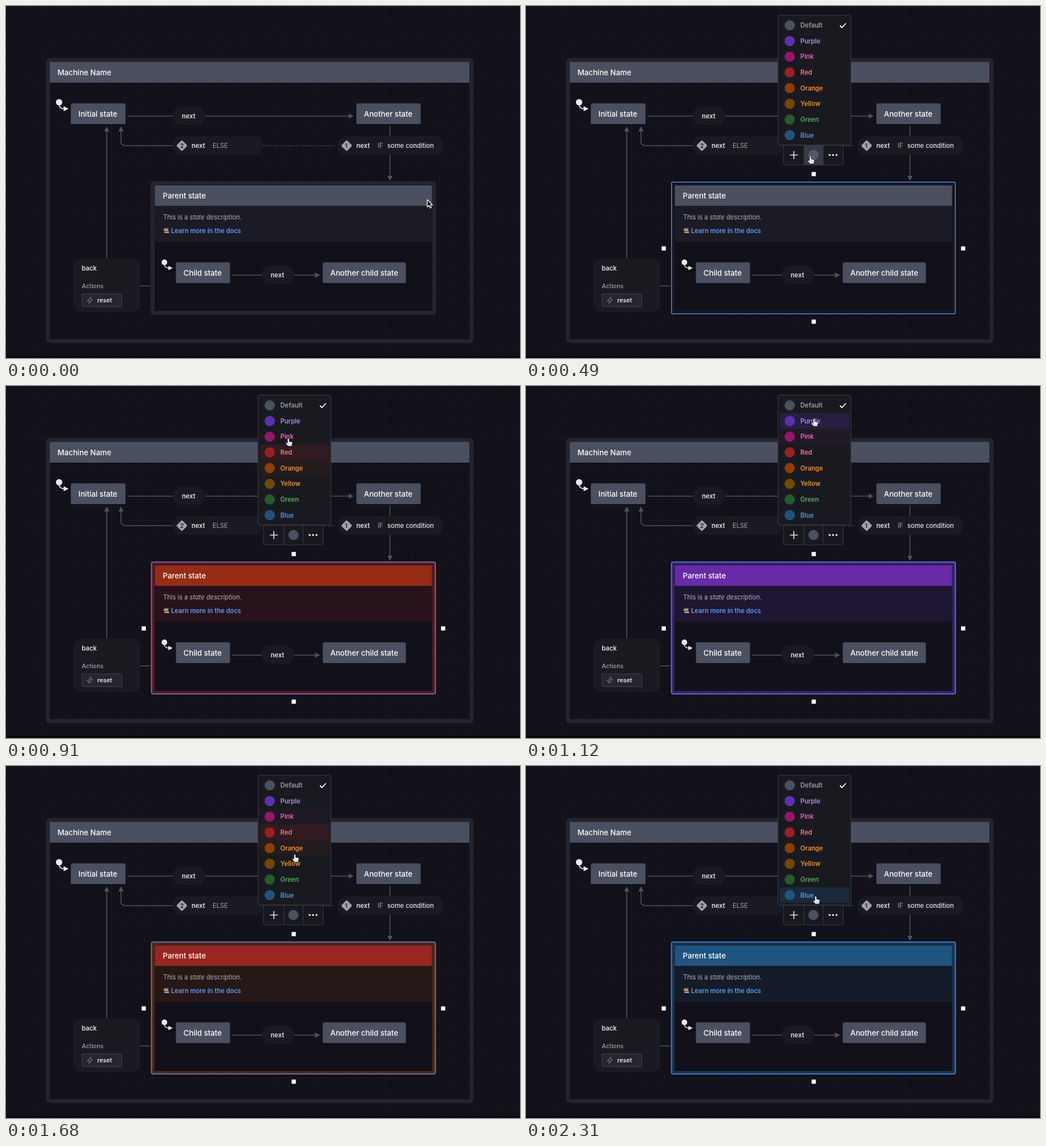
Recreate the animation shown at these times as an HTML page. Size 903 px wide and 620 px high, loop 2.38 s.

```html
<!DOCTYPE html>
<html lang="en">
<head>
<meta charset="utf-8">
<title>State colours</title>
<style>
  html, body { margin: 0; width: 100%; height: 100%; overflow: hidden; background: #12111a; }
  svg { display: block; width: 903px; height: 620px; font-family: Inter, "Open Sans", sans-serif; }
  text { white-space: pre; }
</style>
</head>
<body>
<svg id="stage" viewBox="0 0 903 620"></svg>
<script>
const LOOP = 2380, STEP = 70, SELECT = 140, OPEN = 420, HOVER = 560;
const ROW = 27.63, ROW_TOP = 20.2, LAG = 40;
const BG = [18, 17, 26], EDGE = '#4f515b', SLATE = '#4a505f';

// name, swatch, label colour
const colours = [
  ['Default', [74, 80, 95], '#9c9ba2'],
  ['Purple', [93, 48, 184], '#a98df0'],
  ['Pink', [152, 20, 105], '#f55fc0'],
  ['Red', [156, 31, 31], '#f27878'],
  ['Orange', [143, 61, 0], '#f28b30'],
  ['Yellow', [116, 72, 0], '#e59426'],
  ['Green', [36, 92, 44], '#4fae57'],
  ['Blue', [30, 85, 128], '#4f96e6']
];
const swatches = colours.map(c => c[1]);

// time, x, y
const path = [
  [0, 740, 341], [70, 740, 341], [210, 640, 310], [350, 520, 270], [420, 500, 266],
  [560, 499, 262], [700, 497, 176], [800, 495, 121], [910, 496, 92], [1000, 502, 62],
  [1120, 506, 57], [1350, 507, 59], [1540, 507, 112], [1890, 508, 220],
  [1960, 509, 229], [2380, 509, 229]
];

const rgb = c => `rgb(${c.map(Math.round)})`;
const mix = (a, b, k) => a.map((v, i) => v + (b[i] - v) * k);

function cursorAt(t) {
  const i = Math.max(1, path.findIndex(p => p[0] >= t));
  const [a, b] = [path[i - 1], path[i]];
  return mix(a, b, Math.max(0, (t - a[0]) / (b[0] - a[0]))).slice(1);
}

function hovered(t) {
  if (t < HOVER) return 0;
  const row = Math.floor((cursorAt(t)[1] - ROW_TOP) / ROW);
  return row > 7 ? 0 : row;
}

// Share of each colour over a linear transition of the given length
function weights(t, span) {
  const w = Array(8).fill(0), n = 15;
  for (let i = 0; i < n; i++) w[hovered(t - LAG - span * (i + .5) / n)] += 1 / n;
  return w;
}
const blend = (w, list) => [0, 1, 2].map(k => w.reduce((s, v, i) => s + v * list[i][k], 0));

const rect = (x, y, w, h, fill, rx = 0, more = '') =>
  `<rect x="${x}" y="${y}" width="${w}" height="${h}" rx="${rx}" fill="${fill}" ${more}/>`;
const text = (x, y, s, size = 11.15, weight = 600, fill = '#e4e3e8') =>
  `<text x="${x}" y="${y}" font-size="${size}" font-weight="${weight}" fill="${fill}">${s}</text>`;
const line = (d, more = '') =>
  `<path d="${d}" fill="none" stroke="${EDGE}" stroke-width="1.6" ${more}/>`;
const circle = (x, y, r, fill) => `<circle cx="${x}" cy="${y}" r="${r}" fill="${fill}"/>`;
const title = (x, y, s) => text(x, y, s, 13.2, 500, '#fff');
const pill = (x, y, w, h) => rect(x, y, w, h, '#1a1a21', 15);
const state = (x, y, w, s) => rect(x, y, w, 36.5, SLATE, 2.5) + title(x + 13.3, y + 23.2, s);
const arrow = (x, y, turn) =>
  `<path d="M0 0L-9 -4.5V4.5Z" fill="${EDGE}" transform="translate(${x} ${y}) rotate(${turn})"/>`;
const diamond = (x, y, s) =>
  rect(-7, -7, 14, 14, '#a3a0ad', 2, `transform="translate(${x} ${y}) rotate(45)"`) +
  text(x - 3, y + 3.6, s, 10, 600, '#1a1a21');
const start = (x, y, k) => `<g transform="translate(${x} ${y}) scale(${k})">${circle(0, 0, 5.6, '#e9e8ec')}
  <path d="M0 4C0 9 4 11.500 9 11.500" fill="none" stroke="#e9e8ec" stroke-width="1.8"/>
  <path d="M16.500 11.500L8 7V16Z" fill="#e9e8ec"/></g>`;

function grid() {
  let d = '';
  for (let y = 21; y < 616; y += 24) d += `M0 ${y}.5H903`;
  for (let x = 17; x < 903; x += 24) d += `M${x}.5 0V616`;
  return `<path d="${d}" stroke="#191923" stroke-dasharray="3 1"/>`;
}

const books = rect(277.5, 391, 8, 2.5, '#3f8a58', .5) + rect(277, 393.5, 8, 2, '#d9cdb8', .5) +
  rect(278, 395.5, 8, 2.2, '#b84545', .5) + rect(278.500, 397.7, 8, 2, '#c9b79c', .5);

const machine =
  rect(73.5, 95, 744.3, 495.3, 'none', 3, 'stroke="#25242d" stroke-width="7"') +
  rect(77, 98.5, 737, 36.5, SLATE) + title(90.5, 122, 'Machine Name') +
  line('M214 194H603M177 445V221M293 246H210Q202 246 202 238V221M674.5 211V299M236 493H255') +
  line('M452 246H579', 'stroke-dasharray="2 2.4"') +
  arrow(611, 194, 0) + arrow(177, 212, -90) + arrow(202, 212, -90) + arrow(674.5, 308, 90) +
  start(93.3, 169.5, 1) +
  state(114, 171.5, 96, 'Initial state') + state(615.5, 171.5, 113, 'Another state') +
  pill(293, 177.500, 57, 32) + text(309, 198, 'next') +
  pill(293, 229, 159, 33) + diamond(309, 246, '2') + text(326, 250, 'next') +
  text(363, 250, 'ELSE', 11.15, 400, '#a5a4ab') +
  pill(583, 229, 185, 33) + diamond(598.5, 246, '1') + text(615.5, 250, 'next') +
  text(653, 250, 'IF', 11.15, 400, '#a5a4ab') + text(670, 250, 'some condition', 11.15, 500) +
  pill(118, 445, 118, 94) + text(133, 466, 'back') +
  text(133, 496.5, 'Actions', 10.6, 500, '#a5a4ab') +
  rect(133.5, 507, 70, 22.5, '#25262e', 2, 'stroke="#42444e"') +
  '<path d="M149 512.500L142.500 519.500H147L145.500 524L152.500 517H148Z" fill="none" stroke="#83848e"/>' +
  text(160.3, 521.8, 'reset', 10.6);

const children =
  text(276, 375.5, 'This is a <tspan font-style="italic">state description</tspan>.', 11.15, 400, '#b4b3b9') +
  books + text(290, 399.5, 'Learn more in the docs', 11.15, 600, '#5b9cf5') +
  start(278.3, 451.5, .88) + line('M397 474H545') + arrow(552, 474, 0) +
  pill(449, 457.5, 57, 32) + text(465, 478, 'next') +
  state(298.5, 451.500, 95, 'Child state') + state(556.5, 451.5, 146, 'Another child state');

function parent(t) {
  const selected = t >= SELECT, quick = weights(t, 40);
  const ring = selected
    ? rgb(mix(BG, blend(quick, [[28, 27, 38], ...swatches.slice(1)]), .5)) : '#25242d';
  const inner = blend(quick, swatches);
  let s = rect(257.5, 312, 495, 228.5, '#12111a', 2, `stroke="${ring}" stroke-width="7"`) +
    rect(261.5, 352, 487, 62.5, rgb(mix(BG, inner, .16))) +
    rect(261.5, 414, 487, 1, rgb(mix(BG, inner, .24))) +
    rect(261.5, 316, 487, 36, rgb(blend(weights(t, 150), swatches))) +
    title(275.5, 339.3, 'Parent state') + children;
  if (selected) {
    s += rect(255.7, 310.3, 498.6, 232, 'none', 2.5, 'stroke="#4a86dc" stroke-width="1.5"');
    for (const [x, y] of [[505.5, 296], [242, 427], [768, 427], [505.5, 556]])
      s += rect(x - 4, y - 4, 8, 8, '#fff', 1, 'stroke="#12111a" stroke-width=".6"');
  }
  return s;
}

function toolbar(t) {
  const over = t >= 350 && t < 630;
  return rect(452.5, 245.5, 105, 34.5, '#18181f', 2, 'stroke="#3a3b45"') +
    (over ? rect(488, 246, 34, 34, '#373944') : '') +
    '<path d="M488.500 246V280M522 246V280" stroke="#3a3b45"/>' +
    '<path d="M463.500 262.500H477.500M470.500 255.500V269.500" stroke="#e4e3e8" stroke-width="1.7"/>' +
    circle(505, 262.5, 9, over ? '#555968' : SLATE) +
    [533.5, 539.5, 545.5].map(x => circle(x, 262.5, 1.8, '#e4e3e8')).join('');
}

function menu(t) {
  const w = weights(t, 150);
  return rect(442.7, 16.2, 128, 228.6, '#191a20', 4, 'stroke="#363741" stroke-width="1.3"') +
    colours.map(([name, fill, label], i) => {
      const y = 34 + i * ROW;
      return (i ? rect(446, y - 13.8, 122, 27.6, rgb(fill), 2, `opacity="${.28 * w[i]}"`) : '') +
        circle(463.3, y, 9, rgb(fill)) + text(482, y + 4.1, name, 11.15, 600, label);
    }).join('') +
    '<path d="M551.500 34.500L555 38L562 30.500" fill="none" stroke="#fff" stroke-width="1.8"/>';
}

function pointer(t) {
  const [x, y] = cursorAt(t), hand = t >= 350;
  const d = hand
    ? 'M-1.500 1.500Q0 -1 1.500 1.500V5.500L6 6.500Q7.500 7 7 9.500L6 14H-.5L-4.500 9Q-5 7.300 -3.300 7.500L-1.500 9Z'
    : 'M0 0V13L3 10.300L5 15L7.300 14L5.300 9.500H9.300Z';
  const paint = hand ? 'fill="#fff" stroke="#17171d" stroke-width=".8"'
    : 'fill="#15151b" stroke="#fff" stroke-width="1.2"';
  return `<path d="${d}" ${paint} stroke-linejoin="round" transform="translate(${x} ${y})"/>` +
    (hand ? `<path d="M3 9V12M5 9V12M1 9V12" stroke="#777" stroke-width=".6" transform="translate(${x} ${y})"/>` : '');
}

const stage = document.getElementById('stage');
const base = rect(0, 0, 903, 620, '#12111a') + grid() + rect(0, 616.5, 903, 3.5, '#09080f') + machine;
const begin = performance.now();
let shown = -1;

function frame() {
  const t = Math.floor((performance.now() - begin) % LOOP / STEP) * STEP;
  if (t !== shown) {
    stage.innerHTML = base + parent(t) + (t >= SELECT ? toolbar(t) : '') +
      (t >= OPEN ? menu(t) : '') + pointer(t);
    shown = t;
  }
  requestAnimationFrame(frame);
}
frame();
</script>
</body>
</html>
```
